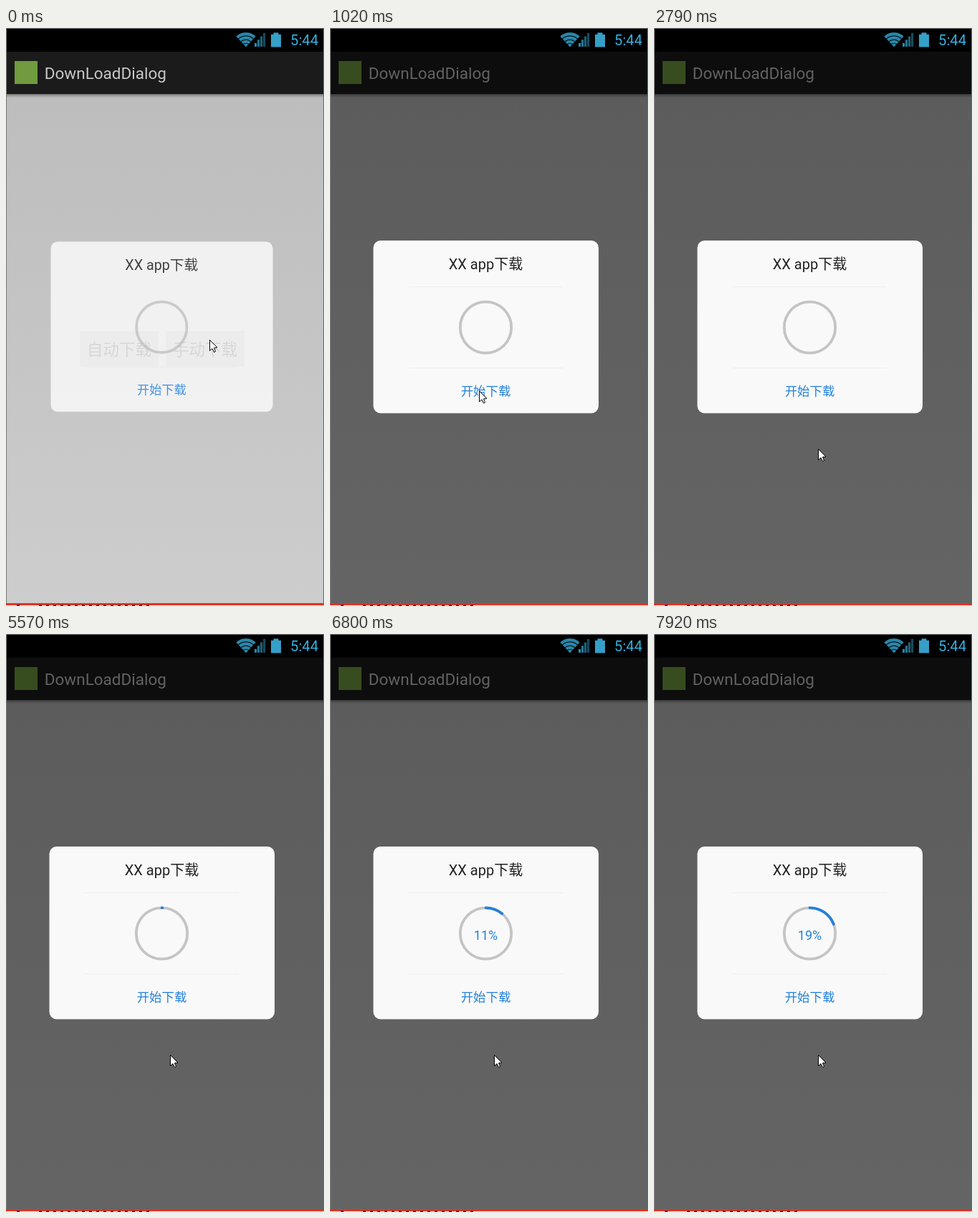
An HTML page with a canvas that plays this animation: 444 px wide and 805 px high, repeating every 8000 ms.

```html
<!DOCTYPE html>
<html lang="zh">
<head>
<meta charset="utf-8">
<style>
  html, body { margin: 0; width: 100%; height: 100%; overflow: hidden; background: #000; }
  canvas { display: block; width: 444px; height: 805px; }
</style>
</head>
<body>
<canvas id="stage" width="444" height="805"></canvas>
<script>
const c = document.getElementById('stage').getContext('2d');
const LOOP = 8000;
const FONT = 'Roboto, "Noto Sans CJK SC", "Noto Sans CJK", sans-serif';
const BLUE = '#2380dc';
const TOP = -Math.PI / 2;

// Number of ticks since start, between 0 and max; the first falls on start itself.
const ticks = (t, start, period, max) =>
  Math.min(max, Math.max(0, Math.floor((t - start) / period) + 1));

function bezier(a, b, d, e, u) {
  const v = 1 - u;
  return v * v * v * a + 3 * v * v * u * b + 3 * v * u * u * d + u * u * u * e;
}

function percentAt(t) {
  if (t < 5540) return 0;
  const k = ticks(t, 5540, 137, 18) - 1;
  return 0.42 + 1.265 * k - 0.0097 * k * k;
}

// A swing onto the link, then a straight move below the dialog.
function cursorAt(t) {
  const swing = ticks(t, 510, 127.5, 5) / 5;
  const leave = ticks(t, 2670, 120, 2) / 2;
  return [
    bezier(284, 332, 160, 208, swing) + 21 * leave,
    bezier(434, 551, 552, 505, swing) + 81 * leave
  ];
}

function rect(x, y, w, h, color) {
  c.fillStyle = color;
  c.fillRect(x, y, w, h);
}

function fade(y, h, from, to) {
  const g = c.createLinearGradient(0, y, 0, y + h);
  g.addColorStop(0, from);
  g.addColorStop(1, to);
  rect(0, y, 444, h, g);
}

function text(str, x, y, size, color, align = 'center') {
  c.font = size + 'px ' + FONT;
  c.textAlign = align;
  c.fillStyle = color;
  c.fillText(str, x, y);
}

function arc(x, y, r, from, to, width, color, cap = 'butt') {
  c.beginPath();
  c.arc(x, y, r, from, to);
  c.lineWidth = width;
  c.lineCap = cap;
  c.strokeStyle = color;
  c.stroke();
}

function statusBar() {
  rect(0, 0, 444, 33, '#000');
  for (let r = 2.5; r < 20; r += 5.2) arc(335, 26.5, r, TOP - 0.74, TOP + 0.74, 4.2, '#2a86a9');
  for (let i = 0; i < 4; i++) {
    const h = 5 + i * 4.7;
    rect(347 + i * 4, 26 - h, 3.2, h, `rgba(43,136,171,${1 - i * 0.15})`);
  }
  rect(370, 9, 14, 17.5, '#359fc8');
  rect(373.5, 6.5, 7, 3, '#359fc8');
  text('5:44', 436, 24, 20.2, '#33b0e0', 'right');
}

function page(dim) {
  fade(92, 709, '#bdbdbd', '#cdcdcd');
  fade(92, 5, 'rgba(0,0,0,.35)', 'rgba(0,0,0,0)');
  rect(0, 33, 444, 59, '#1b1b1b');
  rect(12, 46, 32, 32, '#709b3f');
  text('DownLoadDialog', 53.7, 71, 22.5, '#c8c8c8', 'left');
  rect(0, 33, 444, 768, `rgba(0,0,0,${dim})`);
}

function button(x, label) {
  rect(x, 422, 110, 50, '#a2a2a2');
  text(label, x + 55, 455.5, 22.5, '#111');
}

function dialog(percent) {
  c.fillStyle = '#f9f9f9';
  c.beginPath();
  c.roundRect(60.5, 296, 314.5, 240.5, 10);
  c.fill();
  text('XX app下载', 217.5, 336, 20, '#222');
  rect(110, 360, 215, 1, '#eee');
  rect(110, 473, 215, 1, '#eee');
  text('开始下载', 217.5, 512, 17.4, BLUE);
  arc(217.5, 417, 35.7, 0, 2 * Math.PI, 3.8, '#c4c4c4');
  if (percent > 0) arc(217.5, 417, 35.7, TOP, TOP + percent / 50 * Math.PI, 3.8, BLUE, 'round');
  if (percent >= 1) text(Math.floor(percent) + '%', 217.5, 426.3, 18, BLUE);
}

function border() {
  rect(0, 0, 444, 1, '#777');
  rect(0, 0, 1, 801, '#777');
  rect(0, 804, 444, 1, '#f4f4f4');
  rect(0, 801, 444, 3, '#e8301f');
  rect(443, 0, 1, 804, '#e8301f');
  // tops of a line of writing cut off by the stage
  rect(15, 803, 4, 2, '#22a');
  for (let x = 46; x < 206; x += 10) rect(x, 803.5, 4, 1.5, '#222');
}

function cursor(x, y) {
  c.save();
  c.translate(x + 0.5, y + 0.5);
  c.beginPath();
  [[0, 0], [0, 15], [3.5, 12], [6, 17], [8, 16], [6, 11], [10.5, 10.5]].forEach(p => c.lineTo(...p));
  c.closePath();
  c.fillStyle = '#fff';
  c.fill();
  c.lineWidth = 1;
  c.lineCap = 'butt';
  c.strokeStyle = '#000';
  c.stroke();
  c.restore();
}

function draw(t) {
  const opening = t < 120;
  page(opening ? 0 : t < 510 ? 0.475 : 0.51);
  statusBar();
  c.save();
  if (opening) {
    button(103, '自动下载');
    button(223, '手动下载');
    c.globalAlpha = 0.85;
    c.translate(217.3, 416);
    c.scale(0.986, 0.986);
    c.translate(-217.5, -416.3);
  }
  dialog(percentAt(t));
  c.restore();
  border();
  cursor(...cursorAt(t));
}

const begin = performance.now();
function tick() {
  draw((performance.now() - begin) % LOOP);
  requestAnimationFrame(tick);
}
tick();
</script>
</body>
</html>
```
